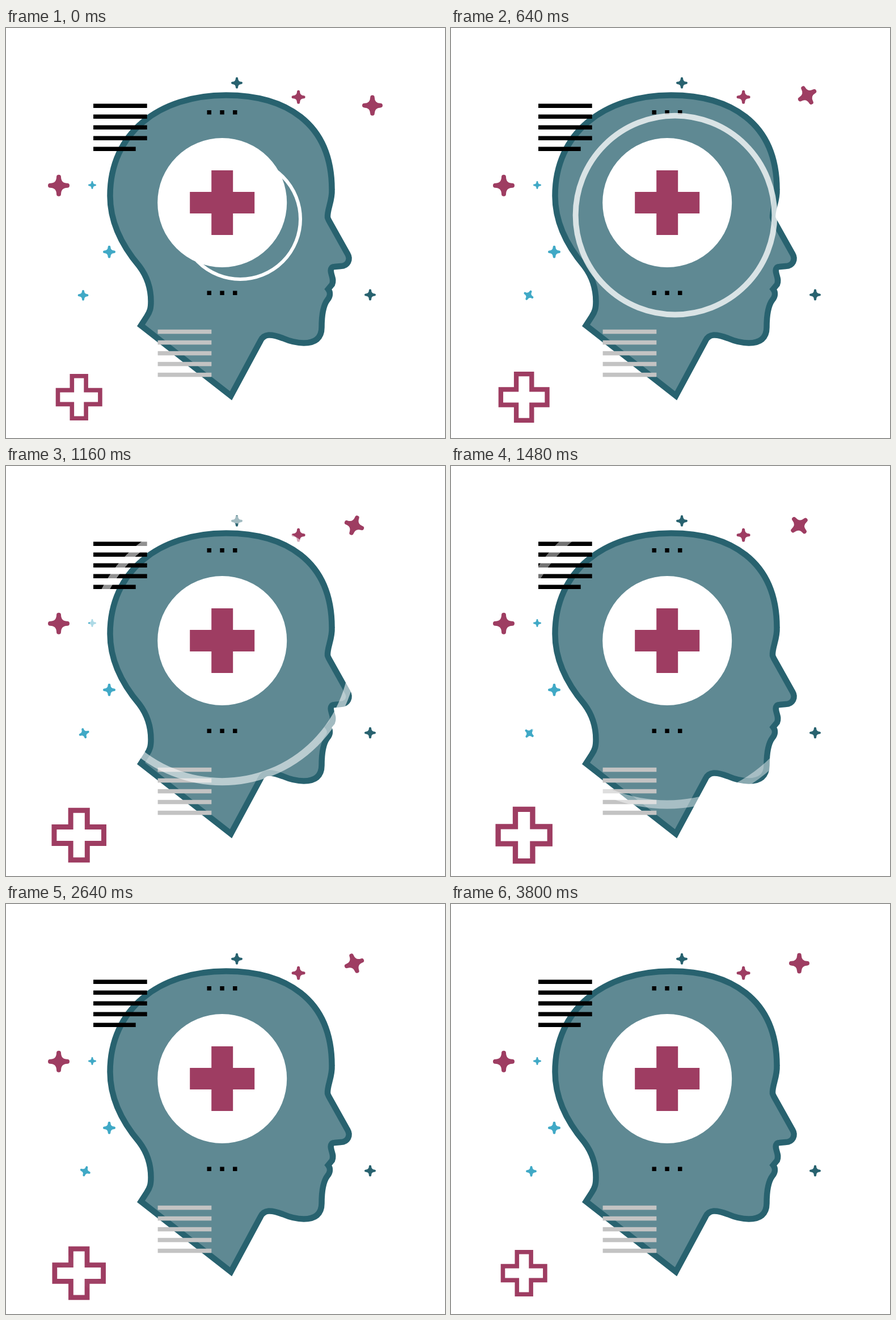
Recreate the animation shown at these times as an HTML page with a canvas. Size 774 by 723 pixels, loop 3.84 s.

```html
<!DOCTYPE html>
<html lang="en">
<head>
<meta charset="utf-8">
<title>Mental health</title>
<style>
html, body { margin: 0; width: 100%; height: 100%; overflow: hidden; background: #fff; }
canvas { display: block; }
</style>
</head>
<body>
<canvas id="stage" width="774" height="723"></canvas>
<script>
const ctx = document.getElementById('stage').getContext('2d');
const LOOP = 3840, STEP = 40, LAST = LOOP - STEP;
const TEAL = '#28626f', SKIN = '#5f8993', PLUM = '#9e3d62', SKY = '#40a9c6', GREY = '#c3c3c3';

const head = new Path2D(`M388 118.5 C490 118.5 574.5 165 574.5 285
  C575.5 305 566 320 567 334 Q567.5 336 569 339 L602 398
  C608 408 603 419.5 590 420 L579 421 C573 421 571.5 426 573.5 433
  C575 440 578 444 575 452 L568 460.5 C573 467 571 474 567 479
  C560 488 556.5 504 556.5 528 C556.5 547 545 555.5 525 555.5
  C512 555.5 502 553 488 547 C467 539 455 539 449 551 L396.5 648.5
  L238 524.5 L248 509 C254 500 255.5 494 255.5 482
  C255.5 460 250 440 235 420 C207 387 183.5 345 183.5 296
  C183.5 185 270 118.5 388 118.5 Z`);

// Unit sparkle: four rounded arms joined by concave curves
const sparkle = new Path2D();
for (let i = 0; i < 4; i++) {
  const a = i * Math.PI / 2, c = Math.cos(a), s = Math.sin(a);
  const at = (x, y) => [x * c - y * s, x * s + y * c];
  sparkle.arc(...at(0, -0.79), 0.21, a - Math.PI, a);
  sparkle.quadraticCurveTo(...at(0.22, -0.22), ...at(0.79, -0.21));
}
sparkle.closePath();

function star(x, y, size, color, angle = 0) {
  ctx.save();
  ctx.translate(x, y);
  ctx.rotate(angle);
  ctx.scale(size, size);
  ctx.fillStyle = color;
  ctx.fill(sparkle);
  ctx.restore();
}

// Plus sign with half extent h and half arm width w
function plus(x, y, h, w) {
  const pts = [[-w, -h], [w, -h], [w, -w], [h, -w], [h, w], [w, w],
    [w, h], [-w, h], [-w, w], [-h, w], [-h, -w], [-w, -w]];
  ctx.beginPath();
  for (const [px, py] of pts) ctx.lineTo(x + px, y + py);
  ctx.closePath();
}

function bars(x, y, color, lastWidth) {
  ctx.fillStyle = color;
  for (let i = 0; i < 5; i++) ctx.fillRect(x, y + 19 * i, i < 4 ? 94.7 : lastWidth, 7.5);
}

function dots(y) {
  ctx.fillStyle = '#000';
  for (const x of [354.5, 377.3, 400]) ctx.fillRect(x, y, 7.5, 7.5);
}

function ring(t, shift) {
  const scale = 1 + t * 0.001023;
  ctx.beginPath();
  ctx.arc(413 - shift, 337 - shift + t * 0.0172, 106 * scale, 0, Math.PI * 2);
  ctx.lineWidth = 6 * scale;
  ctx.globalAlpha = Math.max(0, 1 - t / 2700);
  ctx.strokeStyle = '#fff';
  ctx.stroke();
  ctx.globalAlpha = 1;
}

function outlinedPlus(t) {
  const peak = 1760;
  const grow = t < peak ? t / peak : (LAST - t) / (LAST - peak);
  const scale = 1 + 0.268 * grow;
  plus(128.7, 651, 37.2 * scale, 12.4 * scale);
  ctx.lineWidth = 7.6 * scale;
  ctx.strokeStyle = PLUM;
  ctx.stroke();
}

function draw(t) {
  const turn = Math.PI * 2 * t / LAST;
  const shift = 32 * Math.min(1, t / 1140);

  ctx.fillStyle = '#fff';
  ctx.fillRect(0, 0, 774, 723);

  ctx.fillStyle = SKIN;
  ctx.fill(head);
  ctx.lineWidth = 10.5;
  ctx.strokeStyle = TEAL;
  ctx.stroke(head);

  bars(154, 133.5, '#000', 74.7);
  bars(267.6, 531.8, GREY, 94.7);
  dots(145);
  dots(463.5);

  star(407, 96.8, 10, TEAL);
  star(642, 470.5, 10, TEAL);
  star(515.6, 121.7, 12, PLUM);
  star(93, 277.8, 19, PLUM);
  star(152, 277, 7, SKY);
  star(182, 394.8, 11, SKY);
  star(136 + 5.5 * t / LAST, 471.3, 9.4, SKY, -turn);
  star(646 - shift, 136.6 - shift, 18, PLUM, turn);
  outlinedPlus(t);

  ring(t, shift);

  ctx.beginPath();
  ctx.arc(381.2, 308, 114, 0, Math.PI * 2);
  ctx.fillStyle = '#fff';
  ctx.fill();
  plus(381.2, 308, 57, 19);
  ctx.fillStyle = PLUM;
  ctx.fill();
}

const start = performance.now();
function tick() {
  const elapsed = (performance.now() - start) % LOOP;
  draw(Math.floor(elapsed / STEP) * STEP);
  requestAnimationFrame(tick);
}
tick();
</script>
</body>
</html>
```
